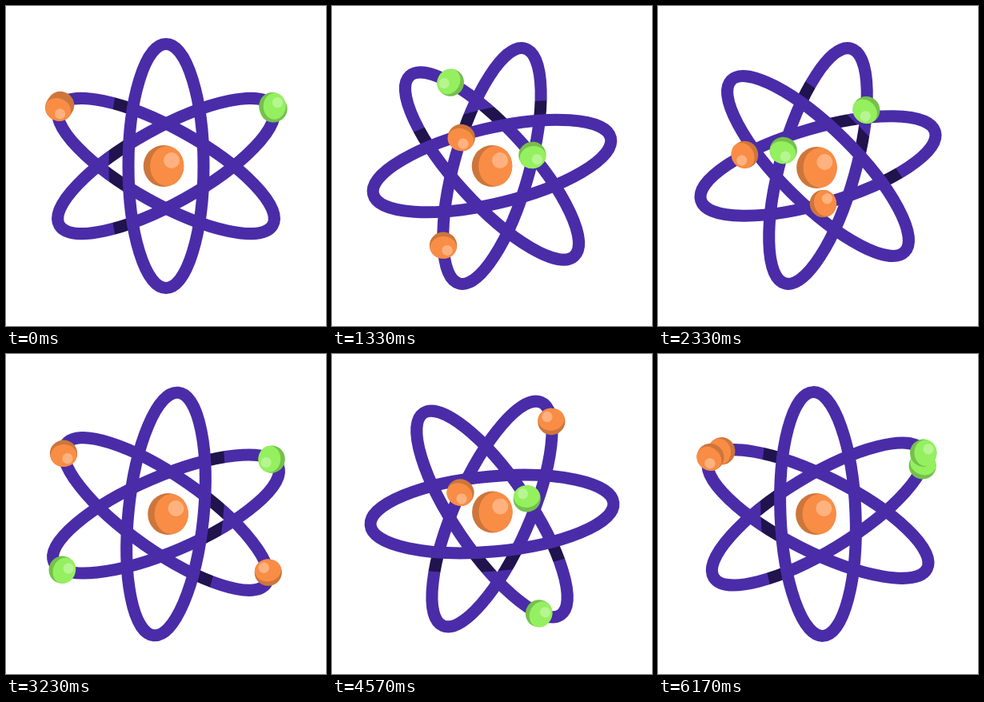
Recreate the animation shown at these times as an HTML page with a canvas. Size 400x400 px, loop 6.23 s.

```html
<!DOCTYPE html>
<html lang="en">
<head>
<meta charset="utf-8">
<title>Atom</title>
<style>
  html, body { margin: 0; width: 100%; height: 100%; overflow: hidden; background: #fff; }
  canvas { display: block; width: 400px; height: 400px; }
</style>
</head>
<body>
<canvas id="stage" width="400" height="400"></canvas>
<script>
const ctx = document.getElementById('stage').getContext('2d');
const LOOP = 6230, POSES = 155, POSE_MS = 40;
const TAU = Math.PI * 2, TILT = 61 * Math.PI / 180;
const LONG = 152.5, SHORT = 47, WIDTH = 15;
const RING = '#4a2ca8', SHADE = '#21134e';
const ORANGE = { base: '#cd763b', lit: '#f98d45', shine: '#ffb27f' };
const GREEN = { base: '#75c04c', lit: '#94f05f', shine: '#b7f590' };

// Nucleus drift: time in ms, x and y offset
const DRIFT = [
  [0, -3, 0], [1330, 0, 0], [2330, -1.6, 2], [3230, 2.5, 0],
  [3930, -1, -2], [5230, 1.7, -3], [6170, -2.6, 0], [LOOP, -3, 0]
];

// Cumulative arc length of the orbit, for constant speed along it
const STEPS = 1440;
const lengths = [0];
for (let i = 0; i < STEPS; i++) {
  const a = (i + 0.5) / STEPS * TAU;
  lengths.push(lengths[i] + Math.hypot(LONG * Math.sin(a), SHORT * Math.cos(a)) * TAU / STEPS);
}
const TOTAL = lengths[STEPS];

function phaseAt(distance) {
  const s = ((distance % TOTAL) + TOTAL) % TOTAL;
  let lo = 0, hi = STEPS;
  while (hi - lo > 1) {
    const mid = (lo + hi) >> 1;
    if (lengths[mid] <= s) lo = mid; else hi = mid;
  }
  return (lo + (s - lengths[lo]) / (lengths[hi] - lengths[lo])) / STEPS * TAU;
}

function driftAt(t) {
  let i = 1;
  while (i < DRIFT.length - 1 && DRIFT[i][0] < t) i++;
  const [t0, x0, y0] = DRIFT[i - 1], [t1, x1, y1] = DRIFT[i];
  const k = (t - t0) / (t1 - t0);
  return [x0 + (x1 - x0) * k, y0 + (y1 - y0) * k];
}

function oval(x, y, rx, ry, color) {
  ctx.fillStyle = color;
  ctx.beginPath();
  ctx.ellipse(x, y, rx, ry, 0, 0, TAU);
  ctx.fill();
}

function ball(x, y, angle, scale, paint) {
  ctx.save();
  ctx.translate(x, y);
  ctx.rotate(angle);
  ctx.scale(scale, scale);
  oval(0, 0, 25.3, 26, paint.base);
  oval(4.2, 0, 21.1, 25, paint.lit);
  oval(10, -7, 10, 10, paint.shine);
  ctx.restore();
}

function ring(tilt) {
  ctx.beginPath();
  ctx.ellipse(0, 0, SHORT, LONG, tilt, 0, TAU);
  ctx.stroke();
}

function rings(spin) {
  ctx.save();
  ctx.rotate(spin);
  ctx.lineWidth = WIDTH;
  ctx.strokeStyle = RING;
  ring(-TILT);
  ring(TILT);
  // The front ring casts its shade only onto the two rings behind it
  ctx.globalCompositeOperation = 'source-atop';
  ctx.strokeStyle = SHADE;
  ctx.lineWidth = 20;
  ctx.beginPath();
  ctx.ellipse(-17, 0, SHORT - 2.5, LONG - 2.5, 0, Math.PI / 2, Math.PI * 1.5);
  ctx.stroke();
  ctx.globalCompositeOperation = 'source-over';
  ctx.lineWidth = WIDTH;
  ctx.strokeStyle = RING;
  ring(0);
  ctx.restore();
}

function electron(tilt, distance, paint, facing) {
  const p = phaseAt(distance), c = Math.cos(p), s = Math.sin(p);
  const ux = Math.sin(tilt), uy = -Math.cos(tilt);
  const x = LONG * c * ux - SHORT * s * uy;
  const y = LONG * c * uy + SHORT * s * ux;
  const heading = Math.atan2(-SHORT * c, LONG * s) + tilt - Math.PI / 2;
  ball(x, y, facing ?? heading, 0.66, paint);
}

function draw(t) {
  // The motion advances in even poses; the first and last are held longer
  const pose = Math.min(POSES - 1, Math.max(0, Math.floor((t - 10) / POSE_MS)));
  const k = pose / POSES, spin = k * TAU;
  const fast = 3 - 1.988 * k * TOTAL, slow = -1 - k * TOTAL;
  ctx.clearRect(0, 0, 400, 400);
  ctx.save();
  ctx.translate(200, 200);
  rings(spin);
  const [dx, dy] = driftAt(t);
  ball(dx, dy, 0, 1, ORANGE);
  electron(spin - TILT, fast, ORANGE);
  electron(spin - TILT, slow, ORANGE);
  electron(spin + TILT, fast, GREEN);
  electron(spin + TILT, slow, GREEN, spin);
  ctx.restore();
}

const start = performance.now();
function tick() {
  draw((performance.now() - start) % LOOP);
  requestAnimationFrame(tick);
}
tick();
</script>
</body>
</html>
```
